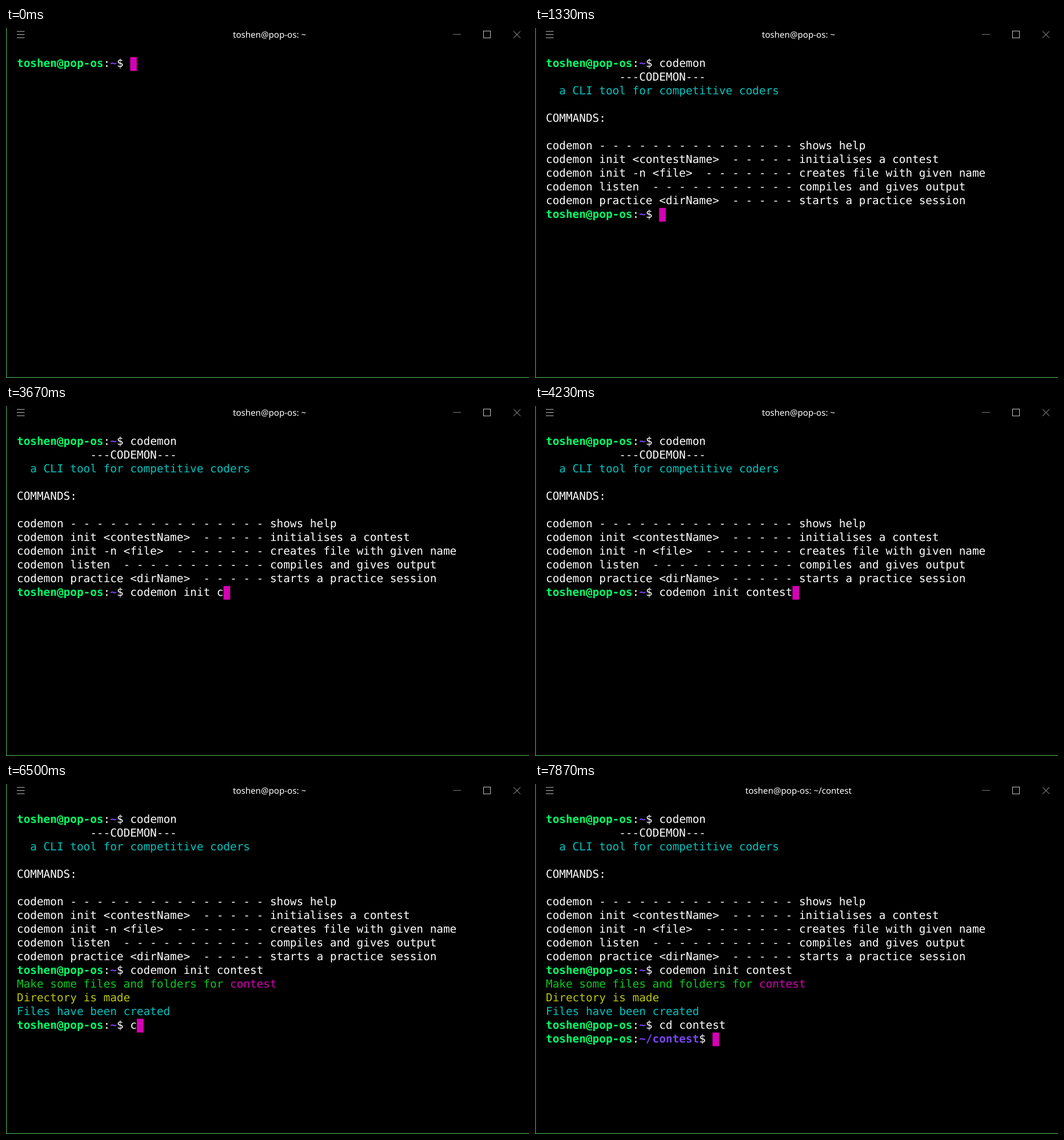
An HTML page for the animation above (8000 ms loop, 915 by 612 pixels).

```html
<!DOCTYPE html>
<html lang="en">
<head>
<meta charset="utf-8">
<title>Terminal</title>
<style>
  html, body { margin: 0; width: 100%; height: 100%; overflow: hidden; background: #000; }
  #stage { position: relative; width: 915px; height: 612px; overflow: hidden; background: #000; }
  svg { position: absolute; inset: 0; }
  #title {
    font: 15.1px "Noto Sans", sans-serif; fill: #fff;
    text-anchor: middle; text-rendering: geometricPrecision;
  }
  .row {
    position: absolute; left: 19px; height: 24px; margin-top: -1px; white-space: pre; color: #fff;
    font: 19.37px/24px "DejaVu Sans Mono", monospace;
    font-variant-ligatures: none; text-rendering: geometricPrecision;
  }
  .host, .path { font-weight: bold; }
  .host { color: #00ff69; }
  .path { color: #7a45f5; }
  .cyan { color: #00c4c0; }
  .green { color: #0cc91f; }
  .yellow { color: #bdc60c; }
  .pink { color: #d600b4; }
</style>
</head>
<body>
<div id="stage">
  <svg width="915" height="612" fill="none">
    <path d="M.75 0V612M0 611.25H915" stroke="#398a3e" stroke-width="1.5"/>
    <path d="M19 6H32.5M19 11.5H32.5M19 17H32.5" stroke="#c4c4c4"/>
    <path d="M782 11.2H796" stroke="#858585"/>
    <rect x="835.5" y="5.3" width="12" height="12" stroke="#c8c8c8"/>
    <path d="M888 5.5L900 17.5M900 5.5L888 17.5" stroke="#b4b4b4"/>
    <text id="title" x="461" y="17"></text>
    <rect id="cursor" width="11.66" height="23.97" fill="#d600b4"/>
  </svg>
</div>
<script>
const LOOP = 8000, LEFT = 19, TOP = 51, COL = 11.66, ROW = 23.97;
const HELP = 1330, MADE = 4930, MOVED = 7870;
const HOST = 'toshen@pop-os';

const stage = document.getElementById('stage');
const cursor = document.getElementById('cursor');
const title = document.getElementById('title');
const timed = [];          // elements with the time they appear
const stops = [];          // cursor stops: [time, row, column]

function span(parent, text, cls, at) {
  const el = document.createElement('span');
  el.textContent = text;
  el.className = cls || '';
  parent.append(el);
  timed.push({ el, at });
}

function line(row, at, ...parts) {
  const el = document.createElement('div');
  el.className = 'row';
  el.style.top = Math.round(TOP + row * ROW) + 'px';
  stage.append(el);
  for (const [text, cls] of parts) span(el, text, cls, at);
  return el;
}

function prompt(row, at, path, command = '', times = []) {
  const el = line(row, at, [HOST, 'host'], [':'], [path, 'path'], ['$ ']);
  const start = HOST.length + path.length + 3;
  stops.push([at, row, start]);
  times.forEach((time, i) => {
    span(el, command[i], '', time);
    stops.push([time, row, start + i + 1]);
  });
}

// Fills the gap up to the description with dashes on even columns.
function usage(row, command, info) {
  let text = command + ' ';
  while (text.length < 38) text += text.length % 2 ? ' ' : '-';
  line(row, HELP, [text + info]);
}

prompt(0, 0, '~', 'codemon', [400, 500, 570, 730, 730, 870, 970]);
stops.push([1200, 1, 0]);

line(1, HELP, [' '.repeat(11) + '---CODEMON---']);
line(2, HELP, ['  a CLI tool for competitive coders', 'cyan']);
line(4, HELP, ['COMMANDS:']);
usage(6, 'codemon', 'shows help');
usage(7, 'codemon init <contestName>', 'initialises a contest');
usage(8, 'codemon init -n <file>', 'creates file with given name');
usage(9, 'codemon listen', 'compiles and gives output');
usage(10, 'codemon practice <dirName>', 'starts a practice session');

prompt(11, HELP, '~', 'codemon init contest', [
  2030, 2130, 2230, 2400, 2400, 2600, 2600, 2800, 2930, 3030, 3130,
  3300, 3400, 3670, 3730, 3800, 3900, 3970, 4130, 4230]);
stops.push([4830, 12, 0]);

line(12, MADE, ['Make some files and folders for ', 'green'], ['contest', 'pink']);
line(13, MADE, ['Directory is made', 'yellow']);
line(14, MADE, ['Files have been created', 'cyan']);
prompt(15, MADE, '~', 'cd contest',
  [6500, 6600, 6730, 6830, 6930, 7030, 7100, 7200, 7370, 7400]);
prompt(16, MOVED, '~/contest');

function draw(t) {
  for (const { el, at } of timed) el.style.visibility = t >= at ? 'visible' : 'hidden';
  const [, row, col] = stops.filter(s => s[0] <= t).pop();
  cursor.setAttribute('x', LEFT + col * COL);
  cursor.setAttribute('y', TOP + row * ROW);
  title.textContent = HOST + ': ' + (t >= MOVED ? '~/contest' : '~');
}

function tick() {
  draw(performance.now() % LOOP);
  requestAnimationFrame(tick);
}
tick();
</script>
</body>
</html>
```
